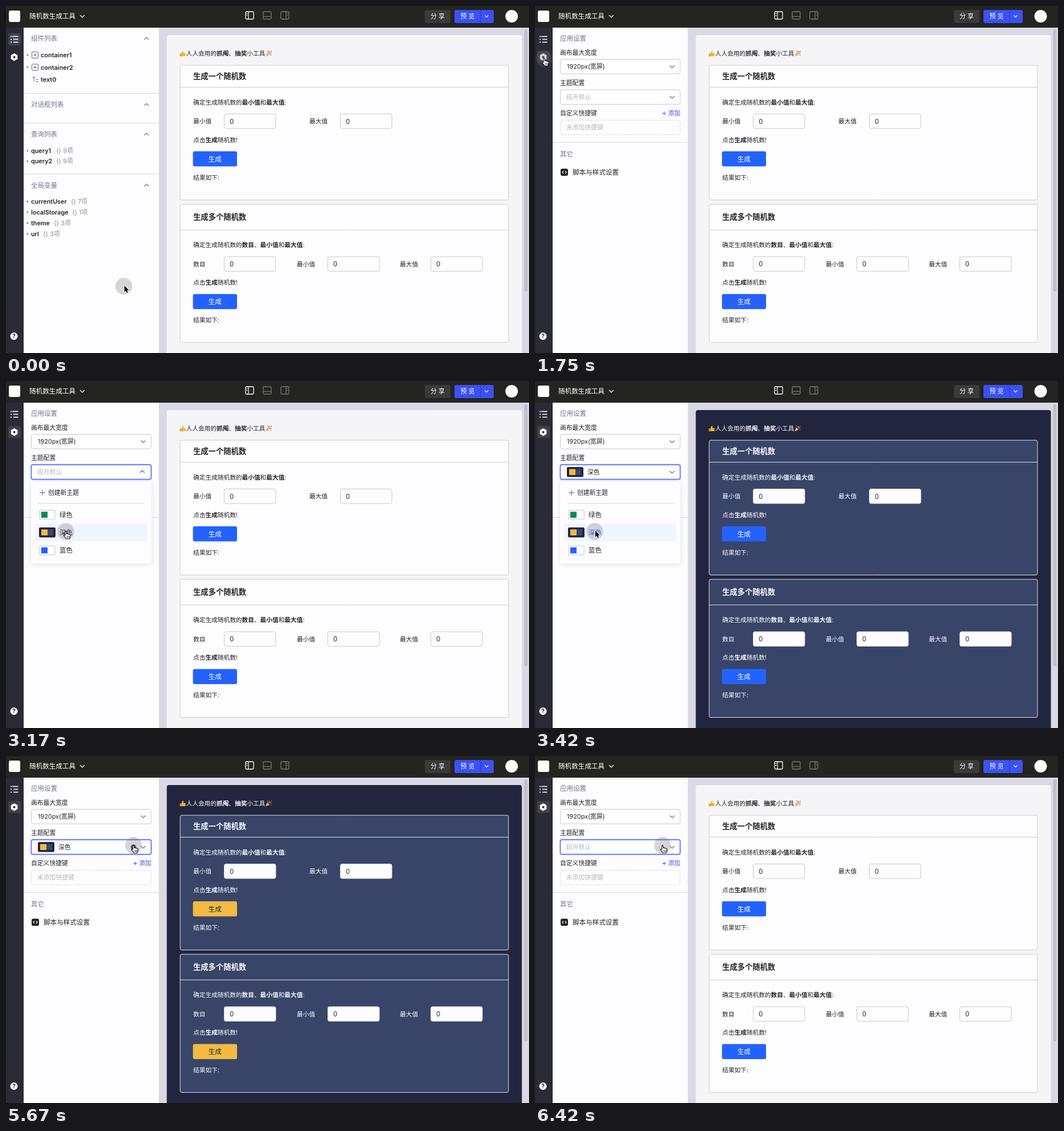
An HTML page with a canvas that plays this animation: 919 px wide and 609 px high, repeating every 7.76 s.

```html
<!DOCTYPE html>
<html lang="zh-CN">
<head>
<meta charset="utf-8">
<title>随机数生成工具</title>
<style>
html, body { margin: 0; width: 100%; height: 100%; overflow: hidden; background: #d9d9e6; }
canvas { display: block; width: 919px; height: 609px; }
</style>
</head>
<body>
<canvas id="stage"></canvas>
<script>
const W = 919, H = 609, LOOP = 7760;
const canvas = document.getElementById('stage');
const ctx = canvas.getContext('2d');
const dpr = window.devicePixelRatio || 1;
canvas.width = Math.round(W * dpr);
canvas.height = Math.round(H * dpr);

const FONT = 'Inter, "Noto Sans CJK SC", "Noto Sans CJK", sans-serif';
const INK = '#23242a', MUTED = '#70748f', FAINT = '#b6b8c2', BLUE = '#3b52f2', LINE = '#d6d8e6';
const PRIMARY = [36, 98, 255], GOLD = [241, 186, 66];
const LIGHT = { page: '#f5f5f7', card: '#fdfdff', line: '#c9cdd5', text: INK, input: '#c3cad2' };
const DARK = { page: '#22253e', card: '#384568', line: '#dfe3ea', text: '#fafbff', input: '#dfe3ea' };

// time, x, y of the pointer halo
const PATH = [
  [0, 207, 492], [420, 207, 492], [500, 197, 485], [670, 152, 350], [750, 112, 247],
  [920, 75, 185], [1000, 60, 163], [1250, 31, 121], [1420, 20, 96], [1500, 16, 92],
  [1750, 16, 92], [1920, 45, 104], [2000, 68, 116], [2170, 123, 149], [2420, 123, 148],
  [2670, 129, 157], [2750, 129, 157], [2920, 112, 240], [3000, 105, 264], [4500, 105, 264],
  [4670, 150, 232], [4750, 190, 200], [4920, 212, 178], [5000, 220, 170], [5250, 220, 163],
  [5420, 224, 157], [LOOP, 224, 157]
];

const clamp = v => Math.max(0, Math.min(1, v));
const ramp = (t, a, b) => clamp((t - a) / (b - a));
const within = (t, a, b) => t >= a && t < b;
const mix = (a, b, k) => `rgb(${a.map((v, i) => Math.round(v + (b[i] - v) * k))})`;

// the screen refreshes twice in every quarter second
function tick(t) {
  const base = Math.floor(t / 250) * 250;
  return t - base >= 170 ? base + 170 : base;
}

function pointerAt(t) {
  let i = 1;
  while (i < PATH.length - 1 && PATH[i][0] < t) i++;
  const a = PATH[i - 1], b = PATH[i], k = ramp(t, a[0], b[0]);
  return [a[1] + (b[1] - a[1]) * k, a[2] + (b[2] - a[2]) * k];
}

function rect(x, y, w, h, color) {
  ctx.fillStyle = color;
  ctx.fillRect(x, y, w, h);
}

function box(x, y, w, h, r, fill, stroke, lw = 1) {
  ctx.beginPath();
  ctx.roundRect(x, y, w, h, r);
  if (fill) { ctx.fillStyle = fill; ctx.fill(); }
  if (stroke) { ctx.strokeStyle = stroke; ctx.lineWidth = lw; ctx.stroke(); }
}

function disc(x, y, r, fill) {
  ctx.beginPath();
  ctx.arc(x, y, r, 0, Math.PI * 2);
  ctx.fillStyle = fill;
  ctx.fill();
}

function poly(points, fill, stroke, lw = 1) {
  ctx.beginPath();
  points.forEach(([x, y], i) => i ? ctx.lineTo(x, y) : ctx.moveTo(x, y));
  if (fill) { ctx.closePath(); ctx.fillStyle = fill; ctx.fill(); }
  if (stroke) { ctx.strokeStyle = stroke; ctx.lineWidth = lw; ctx.stroke(); }
}

const line = (x1, y1, x2, y2, color, lw = 1) => poly([[x1, y1], [x2, y2]], null, color, lw);

function text(s, x, y, size, color, weight = 400, align = 'left') {
  ctx.font = `${weight} ${size}px ${FONT}`;
  ctx.textAlign = align;
  ctx.fillStyle = color;
  ctx.fillText(s, x, y + size * 0.37);
  return ctx.measureText(s).width;
}

// parts between asterisks are bold
function rich(s, x, y, color) {
  s.split('*').forEach((part, i) => { x += text(part, x, y, 10.7, color, i % 2 ? 700 : 400); });
}

function chevron(x, y, dir, color, s = 4) {
  poly([[x - s, y - dir * s / 2], [x, y + dir * s / 2], [x + s, y - dir * s / 2]], null, color, 1.2);
}

function plus(x, y, s, color) {
  line(x - s, y, x + s, y, color);
  line(x, y - s, x, y + s, color);
}

function topBar() {
  rect(0, 0, W, 38, '#242421');
  box(5, 8, 20, 20, 3, '#fff');
  text('随机数生成工具', 41, 18, 11.6, '#fff', 500);
  chevron(134, 18, 1, '#fff');
  [428, 459, 490].forEach((x, i) => {
    const c = i ? '#777775' : '#fff';
    box(x - 7, 10, 14, 13, 1.5, null, c, 1.3);
    if (i === 1) line(x - 7, 18.5, x + 7, 18.5, c, 1.2);
    else {
      const d = i ? 1 : -1;
      line(x + d * 2, 10, x + d * 2, 23, c, 1.2);
      line(x + d * 3.6, 13.5, x + d * 5.6, 13.5, c);
      line(x + d * 3.6, 16.5, x + d * 5.6, 16.5, c);
    }
  });
  box(736, 7, 45, 23, 3, '#3a3a3b');
  text('分 享', 758.5, 18, 11, '#fff', 400, 'center');
  box(788, 7, 69, 23, 3, '#3b51f3');
  line(834, 7, 834, 30, '#2a3ab8');
  text('预 览', 811, 18, 11, '#fff', 400, 'center');
  chevron(844.5, 18, 1, '#fff', 3);
  disc(888.5, 18, 11, '#fff');
}

function sideBar(t) {
  rect(0, 38, 31, H - 38, '#2b2b35');
  if (t < 1670) box(4, 48, 22, 21, 3, '#404152');
  if (t >= 1420) box(4, 79, 22, 21, 3, '#404045');
  [53.5, 58.5, 63.5].forEach((y, i) => {
    const x = i ? 13 : 11;
    rect(8, y - 0.9, 2, 1.8, '#fff');
    rect(x, y - 0.8, 21.5 - x, 1.6, '#fff');
  });
  const hex = [];
  for (let i = 0; i < 6; i++) {
    const a = Math.PI * (i / 3 + 0.5);
    hex.push([14.5 + 6.7 * Math.cos(a), 89.7 + 6.7 * Math.sin(a)]);
  }
  poly(hex, '#fff');
  disc(14.5, 89.7, 2, '#2b2b35');
  disc(14, 579.5, 6.5, '#fff');
  text('?', 14, 579.5, 10, '#23232b', 700, 'center');
}

function caret(y) {
  poly([[36.5, y - 2.3], [40.3, y], [36.5, y + 2.3]], '#8c90a4');
}

function treePanel() {
  [['组件列表', 57], ['对话框列表', 173], ['查询列表', 225], ['全局变量', 314.5]].forEach(([s, y]) => {
    text(s, 44, y, 11.5, MUTED);
    chevron(247, y, -1, MUTED);
  });
  [153.5, 205.5, 295].forEach(y => line(31, y, 268, y, LINE));
  [['container1', 86], ['container2', 107.5]].forEach(([s, y]) => {
    caret(y);
    box(45.5, y - 5.5, 11, 11, 1.5, null, '#5d6178');
    plus(51, y, 2.7, '#5d6178');
    text(s, 61, y, 10.9, INK, 600);
  });
  line(46, 125, 52.5, 125, MUTED);
  line(49, 125, 49, 133, MUTED);
  line(52, 129, 57, 129, MUTED);
  line(52, 132.5, 57, 132.5, MUTED);
  text('text0', 61, 128.5, 10.9, INK, 600);
  [['query1', 254, 88, 9], ['query2', 272.5, 88, 9], ['currentUser', 343, 114, 7],
   ['localStorage', 362, 116, 1], ['theme', 381, 84, 3], ['url', 400, 65, 3]].forEach(([s, y, x, n]) => {
    caret(y);
    text(s, 44, y, 10.8, INK, 600);
    text(`{} ${n}项`, x, y, 10.8, '#8b8fa3');
  });
}

function swatch(x, y, kind) {
  const [bg, left, right] = {
    green: ['#f5f5f6', '#0b8a5a', '#fff'],
    dark: ['#22253e', '#f1ba42', '#3b4770'],
    blue: ['#f5f5f6', '#2462ff', '#fff']
  }[kind];
  box(x + 0.5, y + 0.5, 28, 16.5, 1.5, bg, kind === 'dark' ? '#22253e' : '#d3d5da');
  rect(x + 4, y + 3.5, 11, 10.5, left);
  rect(x + 15, y + 3.5, 10, 10.5, right);
}

function settingsPanel(t) {
  const open = within(t, 2670, 3420), focus = t >= 2420, picked = within(t, 3420, 5920);
  text('应用设置', 44, 57, 11.5, MUTED);
  text('画布最大宽度', 44, 82, 10.8, INK);
  box(44.5, 93.5, 210.5, 25.5, 3, '#fff', '#c6cad6');
  text('1920px(宽屏)', 56, 106, 10.9, INK);
  chevron(241, 106.5, 1, '#666a80');
  text('主题配置', 44, 135, 10.8, INK);
  if (focus) box(44, 146.5, 211.5, 26.5, 3.5, null, 'rgba(59,82,242,.18)', 3);
  box(44.5, 147, 210.5, 25.5, 3, '#fff', focus ? '#4a68f4' : '#c6cad6', focus ? 1.4 : 1);
  if (picked) {
    swatch(56, 151, 'dark');
    text('深色', 92, 160, 10.8, INK);
  } else text('砚舟默认', 55, 160, 10.8, FAINT);
  if (open) chevron(239.5, 159, -1, BLUE);
  else chevron(241, 160, 1, '#666a80');
  if (within(t, 5420, 5920)) {
    disc(224, 160, 4.8, t < 5670 ? '#9b9ca6' : '#55565e');
    line(222.4, 158.4, 225.6, 161.6, '#fff');
    line(225.6, 158.4, 222.4, 161.6, '#fff');
  }
  text('自定义快捷键', 44, 188.5, 10.8, INK);
  plus(227, 188.5, 3.3, BLUE);
  text('添加', 233.7, 188.5, 10.8, BLUE);
  ctx.setLineDash([3, 2]);
  box(44.5, 200.5, 210.5, 25.5, 3, null, '#d3d5de');
  ctx.setLineDash([]);
  text('未添加快捷键', 55, 213.5, 10.8, FAINT);
  line(31, 239.5, 268, 239.5, LINE);
  text('其它', 44, 259.5, 11.5, MUTED);
  box(45, 285.5, 13, 12.5, 3, '#202127');
  poly([[50, 289.5], [47.8, 291.8], [50, 294]], null, '#fff', 1.1);
  poly([[53, 289.5], [55.2, 291.8], [53, 294]], null, '#fff', 1.1);
  text('脚本与样式设置', 66, 292, 11.6, INK);

  const alpha = t < 3500 ? (t < 2670 ? 0 : t < 2750 ? 0.7 : 1) : 1 - ramp(t, 3500, 3750);
  if (alpha > 0) menu(t, alpha);
}

function menu(t, alpha) {
  ctx.save();
  ctx.globalAlpha = alpha;
  ctx.shadowColor = 'rgba(50,60,110,.16)';
  ctx.shadowBlur = 9 * dpr;
  ctx.shadowOffsetY = 1 * dpr;
  box(44, 177, 211.5, 143.5, 4, '#fdfdff');
  ctx.shadowColor = 'transparent';
  plus(64, 196, 5, '#555868');
  text('创建新主题', 74, 196.5, 10.8, INK);
  line(57, 214.5, 243, 214.5, LINE);
  if (t >= 3170) rect(51, 250, 197, 31.5, '#f0f6ff');
  [['green', '绿色', 234.5], ['dark', '深色', 265.5], ['blue', '蓝色', 297]].forEach(([kind, s, y]) => {
    swatch(58, y - 8.5, kind);
    text(s, 94, y, 11.4, kind === 'dark' && t >= 3420 ? BLUE : INK);
  });
  ctx.restore();
}

function thumb(x, y) {
  poly([[x + 3.5, y - 0.5], [x + 5.2, y - 5], [x + 7, y - 4.5], [x + 6.5, y - 1], [x + 10.5, y - 0.8],
    [x + 10.3, y + 4.6], [x + 4, y + 4.6]], '#f6b62c');
  rect(x + 0.5, y - 0.2, 3.4, 5, '#e99a1f');
}

function popper(x, y) {
  poly([[x, y + 5], [x + 3.2, y - 2.6], [x + 7, y + 2.2]], '#f4b63a');
  line(x + 5, y - 1, x + 7.5, y - 4.5, '#e2574c', 1.3);
  line(x + 6.5, y + 0.5, x + 10.5, y - 1, '#8a5bd0', 1.2);
  [['#e2574c', 10, -4], ['#3f8fe0', 4, -4.6], ['#e2574c', 9.6, 2.6], ['#f4b63a', 8, -2.2]]
    .forEach(([c, dx, dy]) => disc(x + dx, y + dy, 0.9, c));
}

function field(label, lx, x, y, th) {
  text(label, lx, y, 10.7, th.text);
  box(x + 0.5, y - 13, 90.5, 25.5, 3, '#fdfdff', th.input);
  text('0', x + 10, y, 11.4, INK);
}

function card(y, h, head, title, intro, fields, th, fill, label) {
  box(306, y, 577, h, 3, th.card, th.line);
  line(306, y + head, 883, y + head, th.line);
  text(title, 329, y + head / 2 - 0.5, 13.3, th.text, 700);
  const top = y + head + 26.5;
  rich(intro, 329, top, th.text);
  fields.forEach(f => field(...f, top + 33.5, th));
  rich('点击*生成*随机数!', 329, top + 66, th.text);
  box(328.5, top + 86, 77.5, 26.5, 3, fill);
  text('生成', 367.3, top + 99.3, 11.5, label, 400, 'center');
  text('结果如下:', 329, top + 131.7, 10.7, th.text);
}

function workspace(t) {
  const dark = within(t, 3420, 5920), th = dark ? DARK : LIGHT;
  const k = ramp(t, 3500, 3750) - ramp(t, 6000, 6250);
  const fill = mix(PRIMARY, GOLD, k), label = mix([255, 255, 255], [35, 36, 42], k);
  rect(268, 38, W - 268, H - 38, '#d9d9e6');
  box(910.5, 41, 6, 460, 3, '#c0c0ca');
  box(282.5, 51, 624, H, [4, 4, 0, 0], th.page);
  thumb(305, 83.5);
  rich('人人会用的*抓阄*、*抽奖*小工具', 316.5, 83.5, th.text);
  popper(456, 83.5);
  card(104, 236.5, 38.5, '生成一个随机数', '确定生成随机数的*最小值*和*最大值*:',
    [['最小值', 329, 383], ['最大值', 533, 587]], th, fill, label);
  card(348, 242.5, 45, '生成多个随机数', '确定生成随机数的*数目*、*最小值*和*最大值*:',
    [['数目', 329, 383], ['最小值', 511, 565], ['最大值', 692, 746]], th, fill, label);
}

function pointer(t) {
  const [x, y] = pointerAt(t);
  const hand = within(t, 1420, 3420) || t >= 5000;
  disc(x, y, 14.7, 'rgba(95,95,110,.26)');
  ctx.save();
  ctx.lineJoin = 'round';
  if (hand) {
    ctx.translate(x - 4, y - 1);
    ctx.beginPath();
    ctx.moveTo(3, 8);
    ctx.lineTo(3, 1.8);
    ctx.quadraticCurveTo(4, 0, 5.2, 1.8);
    ctx.lineTo(5.4, 5.4);
    ctx.quadraticCurveTo(6.8, 4.2, 7.8, 5.8);
    ctx.quadraticCurveTo(9.2, 4.9, 10, 6.4);
    ctx.quadraticCurveTo(11.6, 5.9, 12, 7.6);
    ctx.quadraticCurveTo(12.1, 10.5, 10.6, 14);
    ctx.lineTo(5, 14);
    ctx.quadraticCurveTo(3, 11.2, 0.4, 8.6);
    ctx.quadraticCurveTo(0.6, 6.6, 3, 8);
    ctx.closePath();
    ctx.fillStyle = '#fff';
    ctx.fill();
    ctx.strokeStyle = '#111';
    ctx.lineWidth = 1.1;
    ctx.stroke();
    [6.3, 8, 9.7].forEach(dx => line(dx, 9.3, dx, 12, '#111', 0.8));
  } else {
    const shape = [[0, 0], [0, 11.2], [2.6, 8.9], [4.3, 12.8], [6.2, 12], [4.5, 8.2], [8, 8], [0, 0]];
    ctx.translate(x + 1, y - 1.2);
    poly(shape, null, '#fff', 2);
    poly(shape, '#000');
  }
  ctx.restore();
}

function draw(now) {
  const t = tick(now % LOOP);
  ctx.setTransform(dpr, 0, 0, dpr, 0, 0);
  workspace(t);
  rect(31, 38, 237.5, H - 38, '#fdfdff');
  topBar();
  sideBar(t);
  if (t < 1670) treePanel();
  else settingsPanel(t);
  pointer(t);
}

let start;
function loop(now) {
  if (start === undefined) start = now;
  draw(now - start);
  requestAnimationFrame(loop);
}
draw(0);
requestAnimationFrame(loop);
</script>
</body>
</html>
```
